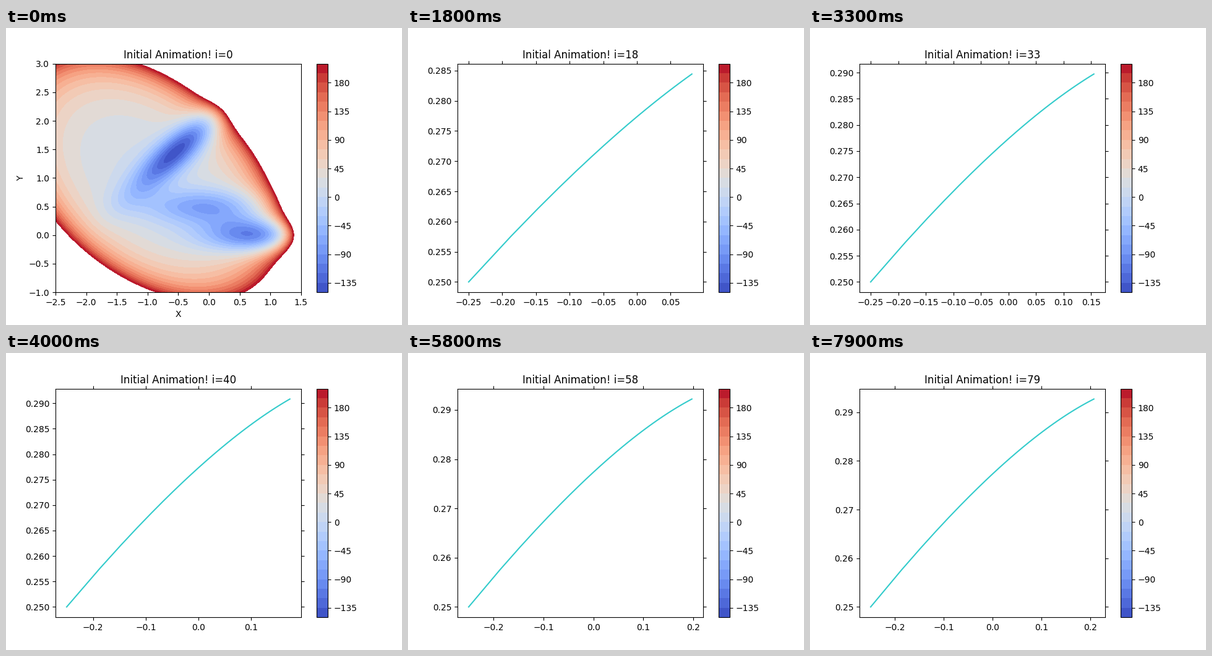
Write a matplotlib script that moves like this. It is 640 px wide and 480 px high and loops after 8000 ms.

```python
import numpy as np
import matplotlib.pyplot as plt
from matplotlib.animation import FuncAnimation

FRAMES = 80
STEP = 0.05

# Sum of four Gaussians: amplitude, a, b, c, x0, y0
TERMS = [
    (-200, -1, 0, -10, 1, 0),
    (-100, -1, 0, -10, 0, 0.5),
    (-170, -6.5, 11, -6.5, -0.5, 1.5),
    (15, 0.7, 0.6, 0.7, -1, 1),
]


def potential(x, y):
    total = 0
    for amp, a, b, c, x0, y0 in TERMS:
        dx, dy = x - x0, y - y0
        total = total + amp * np.exp(a * dx**2 + b * dx * dy + c * dy**2)
    return total


def derivatives(x, y):
    """Gradient and Hessian of the potential."""
    grad, hess = np.zeros(2), np.zeros((2, 2))
    for amp, a, b, c, x0, y0 in TERMS:
        dx, dy = x - x0, y - y0
        v = amp * np.exp(a * dx**2 + b * dx * dy + c * dy**2)
        p = np.array([2 * a * dx + b * dy, b * dx + 2 * c * dy])
        grad += v * p
        hess += v * (np.outer(p, p) + [[2 * a, b], [b, 2 * c]])
    return grad, hess


def newton_path(start, count):
    """Damped Newton search, which settles on the saddle point."""
    points = [np.array(start, float)]
    while len(points) < count:
        grad, hess = derivatives(*points[-1])
        points.append(points[-1] - STEP * np.linalg.solve(hess, grad))
    return np.array(points)


path = newton_path((-0.25, 0.25), FRAMES)
X, Y = np.meshgrid(np.linspace(-2.5, 1.5, 400), np.linspace(-1, 3, 400))
Z = potential(X, Y)
levels = np.arange(-150, 211, 15)

fig, ax = plt.subplots(figsize=(6.4, 4.8), dpi=100)


def draw_surface():
    return ax.contourf(X, Y, Z, levels=levels, cmap="coolwarm")


fig.colorbar(draw_surface(), ax=ax)


def update(i):
    ax.clear()
    if i == 0:
        draw_surface()
        ax.set_xlabel("X")
        ax.set_ylabel("Y")
        ax.xaxis.set_ticks_position("bottom")
        ax.yaxis.set_ticks_position("left")
    else:
        ax.plot(path[:i, 0], path[:i, 1], "c", alpha=0.8)
        ax.xaxis.set_ticks_position("default")
        ax.yaxis.set_ticks_position("default")
    ax.set_title(f"Initial Animation! i={i}", y=1.0)
    return []


anim = FuncAnimation(fig, update, frames=FRAMES, interval=100,
                     init_func=lambda: update(0), repeat=True, repeat_delay=0)
plt.show()
```
